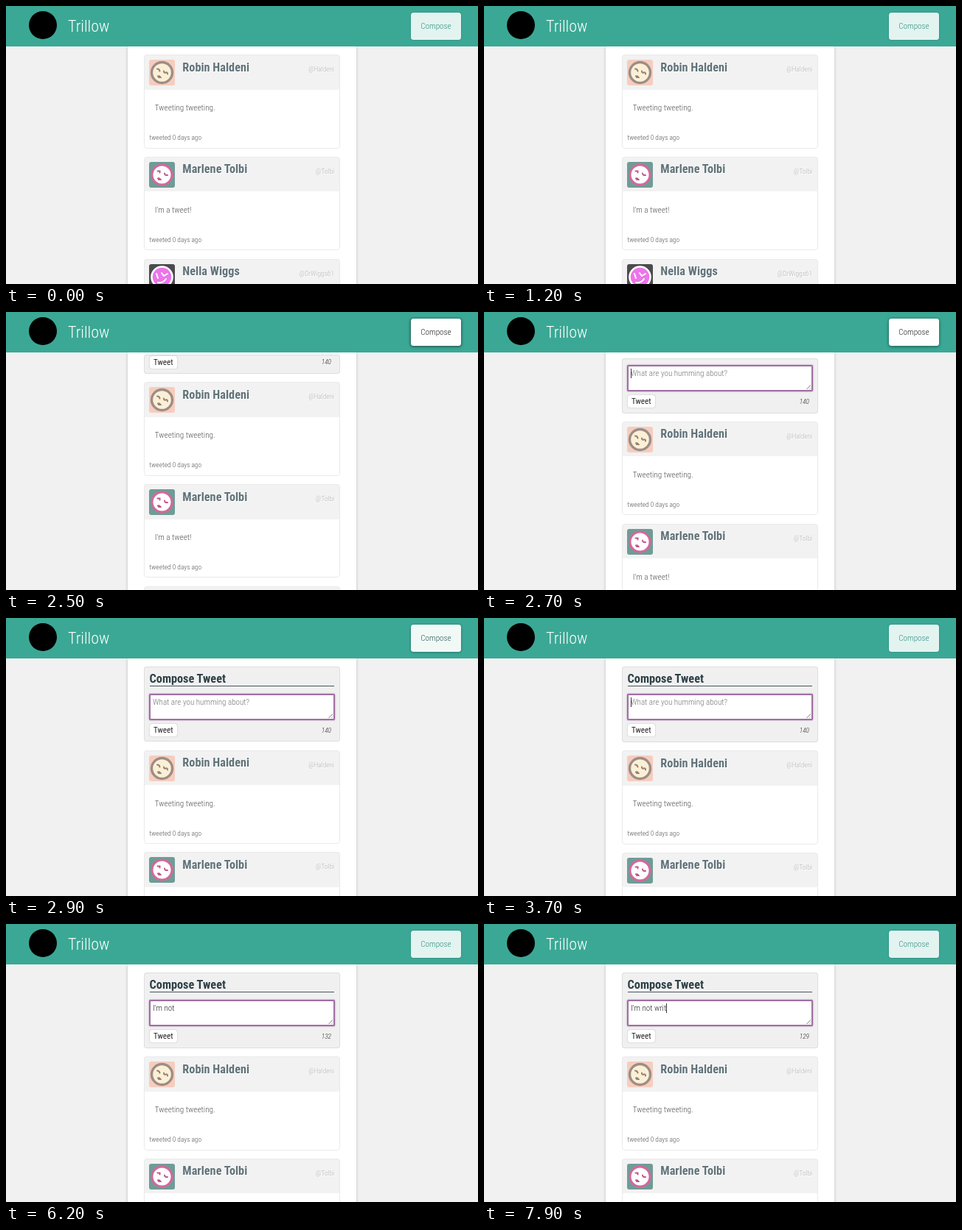
An HTML page for the animation above (8000 ms loop, 640x378 px).

```html
<!DOCTYPE html>
<html lang="en">
<head>
<meta charset="utf-8">
<title>Trillow</title>
<style>
  html, body { margin: 0; width: 100%; height: 100%; overflow: hidden; }
  body {
    background: #f1f1f1;
    font: 300 11.2px/20px "Roboto Condensed", Roboto, sans-serif;
    font-stretch: 75%;
  }
  * { box-sizing: border-box; }
  /* Tighter tracking when only the normal width is available */
  .wide * { letter-spacing: -.055em; }

  .stage { position: relative; width: 640px; height: 378px; overflow: hidden; }
  .stage * { white-space: pre; }
  .bar { position: absolute; inset: 0 0 auto; height: 55px; background: #3ba895; }
  .logo { position: absolute; left: 31px; top: 7px; width: 38px; height: 38px; border-radius: 50%; background: #000; }
  .brand { position: absolute; left: 84px; top: 18.3px; font-size: 22px; color: #fff; }
  .compose {
    position: absolute; left: 549px; top: 9px; width: 68px; height: 37px;
    border-radius: 3.5px; line-height: 37.5px; text-align: center;
    animation: press 8s linear infinite;
  }

  .column {
    position: absolute; left: 165px; top: 55px; width: 310px; height: 500px;
    padding: 0 22px; display: flex; flex-direction: column;
    background: #fff; box-shadow: 0 0 4px rgba(0, 0, 0, .22);
  }
  .column > * { flex: none; }

  .form {
    position: relative; overflow: hidden; border-radius: 4px;
    background: #f0f0f0; box-shadow: inset 0 0 0 1px #dedede;
    animation: slide 8s infinite;
  }
  .inner { position: absolute; left: 0; bottom: 0; width: 266px; height: 102.6px; }
  .inner > * { position: absolute; }
  h2, h3 { margin: 0; font-size: 16.3px; font-weight: 700; line-height: 20px; }
  h2 { left: 7.5px; top: 7px; width: 250.5px; height: 20.2px; color: #2e4047; border-bottom: 1px solid #48545a; }
  .box {
    left: 7px; top: 36.9px; width: 251.5px; height: 36px; padding: 0 3px;
    border: 2px solid #9f6fa2; border-radius: 2px; background: #fff;
    box-shadow: 0 0 2px #9f6fa2; line-height: 19.5px; font-size: 11.1px; color: #222;
  }
  .box::after {
    content: ""; position: absolute; right: 1px; bottom: 1px; width: 6px; height: 6px;
    background: linear-gradient(135deg, transparent 50%, #bbb 50% 60%, transparent 60% 76%, #bbb 76% 88%, transparent 88%);
  }
  .caret { display: inline-block; width: 1px; height: 13px; margin-right: -1px; vertical-align: -3px; background: #333; }
  .hint { color: #747474; }
  .send {
    left: 7.5px; top: 78.2px; width: 37.5px; height: 17px; border-radius: 3px;
    background: #fff; box-shadow: 0 0 1.5px rgba(0, 0, 0, .35);
    line-height: 17px; text-align: center; color: #222; font-weight: 400;
  }
  .left { right: 12px; top: 77px; font-size: 9.4px; font-style: italic; color: #333; }

  .card {
    position: relative; height: 127.4px; margin-top: 11.3px;
    border-radius: 4px; background: #fff; overflow: hidden;
  }
  .card::after { content: ""; position: absolute; inset: 0; border: 1px solid #eaeaea; border-radius: 4px; }
  .card > * { position: absolute; }
  .top { inset: 0 0 auto; height: 47.5px; background: #f2f2f2; }
  .card svg { left: 7.3px; top: 7px; width: 35px; height: 35px; border-radius: 3px; }
  h3 { left: 52.3px; top: 7.5px; color: #61737a; text-shadow: 1px 1px #fff; }
  .user { right: 8px; top: 10px; font-size: 9.4px; color: #b5b5b5; text-shadow: 1px 1px #fff; }
  .text { left: 14.7px; top: 63px; color: #555; }
  .age { left: 7.5px; top: 103px; font-size: 9.4px; color: #555; }

  @keyframes slide {
    0%, 28.56% { margin-top: 0; height: 0; animation-timing-function: cubic-bezier(.364, 0, .636, 1); }
    36.58%, 100% { margin-top: 11.3px; height: 102.6px; }
  }
  @keyframes press {
    0%, 20%, 38.2%, 100% { background: #e3f3f0; color: #2f9080; box-shadow: 0 0 2px rgba(0, 0, 0, .3); }
    25%, 27%, 32%, 34.3% { background: #fff; color: #222; box-shadow: 0 1px 4px rgba(20, 45, 50, .7); }
    28%, 30% { background: #fff; color: #222; box-shadow: 0 0 3px 2px rgba(35, 62, 70, .85); }
  }
</style>
</head>
<body>
<div class="stage">
  <div class="column">
    <div class="form"><div class="inner">
      <h2>Compose Tweet</h2>
      <div class="box"><span id="typed"></span><span class="caret" id="caret"></span><span class="hint" id="hint">What are you humming about?</span></div>
      <div class="send">Tweet</div>
      <div class="left" id="left">140</div>
    </div></div>

    <div class="card">
      <div class="top"></div>
      <svg viewBox="0 0 35 35">
        <rect width="35" height="35" fill="#f6cdbd"/>
        <circle cx="17.5" cy="17.5" r="14" fill="#faf0d6" stroke="#9d8d88" stroke-width="3.4"/>
        <path d="M11 12.5q3 0 3.500 3M20 15.500q0 3 2.500 2t2.500 2M12 22.500q2-1 3.500 1.500h-2.500" fill="none" stroke="#9a7e74" stroke-width="2" stroke-linecap="round"/>
      </svg>
      <h3>Robin Haldeni</h3><div class="user">@Haldeni</div>
      <div class="text">Tweeting tweeting.</div><div class="age">tweeted 0 days ago</div>
    </div>

    <div class="card">
      <div class="top"></div>
      <svg viewBox="0 0 35 35">
        <rect width="35" height="35" fill="#6f9c96"/>
        <circle cx="17.5" cy="17.5" r="13.5" fill="#fff" stroke="#d5679c" stroke-width="3"/>
        <path d="M11.500 12.500h3v2M21 15.500q0 3 4 2.500M12 22.500q2-1 3.500 1.500h-2.500" fill="none" stroke="#c0578c" stroke-width="2" stroke-linecap="round"/>
      </svg>
      <h3>Marlene Tolbi</h3><div class="user">@Tolbi</div>
      <div class="text">I'm a tweet!</div><div class="age">tweeted 0 days ago</div>
    </div>

    <div class="card">
      <div class="top"></div>
      <svg viewBox="0 0 35 35">
        <rect width="35" height="35" fill="#4c4b4e"/>
        <circle cx="17.5" cy="17.5" r="14" fill="#ec75ea" stroke="#fff" stroke-width="2.6"/>
        <path d="M10 13l2 6M17 12l3 4 5-3M12 25q7 1 11-5" fill="none" stroke="#fff" stroke-width="2" stroke-linecap="round"/>
      </svg>
      <h3>Nella Wiggs</h3><div class="user">@DrWiggs61</div>
    </div>
  </div>

  <div class="bar">
    <div class="logo"></div>
    <div class="brand">Trillow</div>
    <div class="compose">Compose</div>
  </div>
</div>
<script>
  const LOOP = 8000, BLINK = 530, FOCUS = 2310, COUNT_LAG = 80;
  const message = "I'm not writ";
  const keys = [4250, 4450, 4600, 4950, 5150, 5300, 5450, 5660, 7400, 7560, 7700, 7870];
  const el = id => document.getElementById(id);
  const typed = el("typed"), caret = el("caret"), hint = el("hint"), left = el("left");

  function textWidth(family, stretch) {
    const probe = document.createElement("span");
    probe.style.cssText = `position:absolute;font:300 40px ${family};font-stretch:${stretch}`;
    probe.textContent = "humming about";
    document.body.append(probe);
    const width = probe.getBoundingClientRect().width;
    probe.remove();
    return width;
  }
  const condensed = textWidth('"Roboto Condensed", Roboto, sans-serif', "75%");
  const normal = textWidth("Roboto, sans-serif", "100%");
  document.body.classList.toggle("wide", condensed > normal * .95);

  const pressed = t => keys.filter(k => k <= t).length;

  function draw(t) {
    const n = pressed(t);
    const lastKey = n ? keys[n - 1] : FOCUS;
    const lit = t >= FOCUS && Math.floor((t - lastKey) / BLINK) % 2 === 0;
    typed.textContent = message.slice(0, n);
    hint.style.display = n ? "none" : "";
    caret.style.opacity = lit ? 1 : 0;
    left.textContent = 140 - pressed(t - COUNT_LAG);
  }

  let start;
  function tick(now) {
    start ??= now;
    draw((now - start) % LOOP);
    requestAnimationFrame(tick);
  }
  requestAnimationFrame(tick);
</script>
</body>
</html>
```
